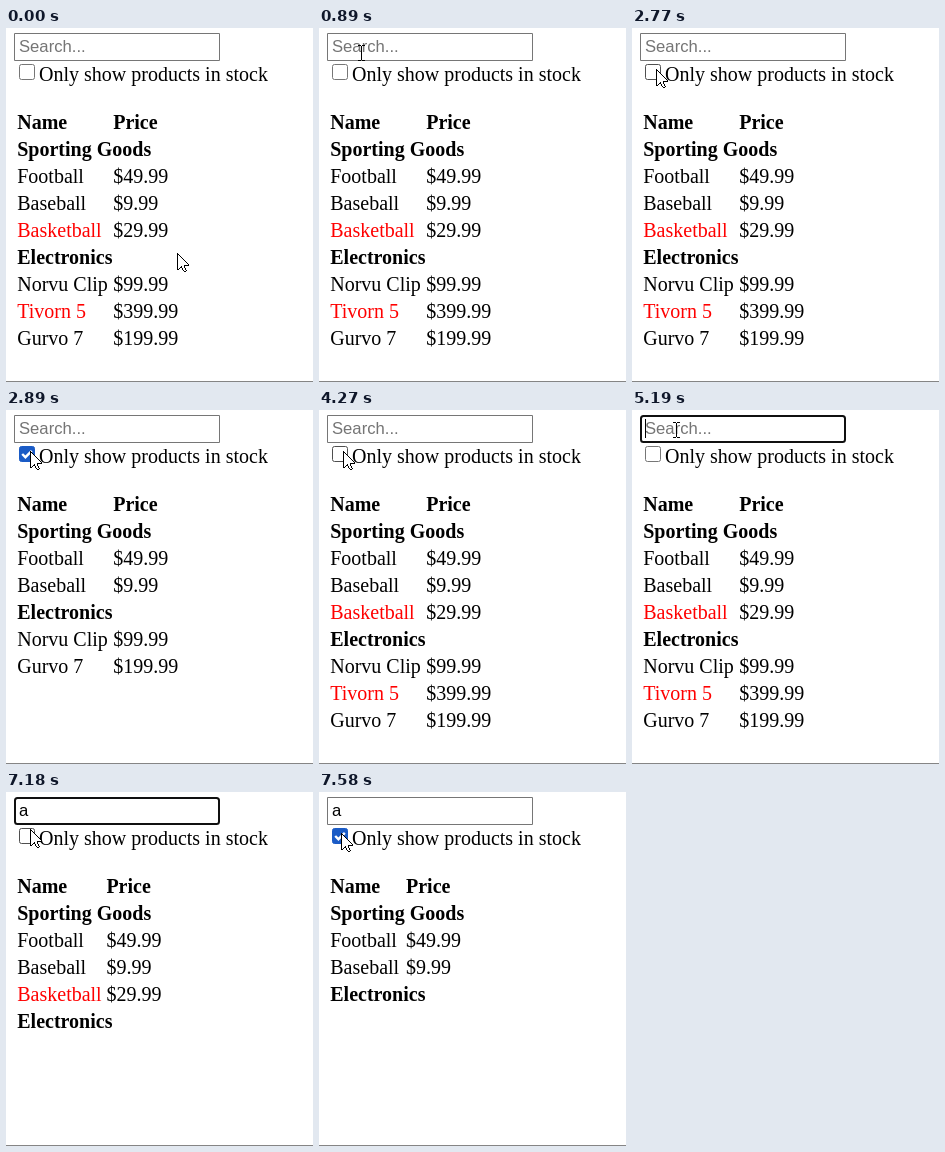
An HTML page with a canvas for the animation above (8000 ms loop, 307 px wide and 354 px high).

```html
<!DOCTYPE html>
<html lang="en">
<head>
<meta charset="utf-8">
<title>Searchable product table</title>
<style>
  html, body { margin: 0; width: 100%; height: 100%; overflow: hidden; background: #fff; }
  canvas { display: block; }
</style>
</head>
<body>
<canvas id="stage" width="307" height="354"></canvas>
<script>
const ctx = document.getElementById('stage').getContext('2d');
const LOOP = 8000;
const SERIF = '20px "Liberation Serif", "Times New Roman", serif';
const SANS = '16.67px "Liberation Sans", Arial, sans-serif';
const GREY = '#767676';

const GROUPS = [
  { title: 'Sporting Goods', items: [
    { name: 'Football', price: '$49.99', stocked: true },
    { name: 'Baseball', price: '$9.99', stocked: true },
    { name: 'Basketball', price: '$29.99', stocked: false }
  ] },
  { title: 'Electronics', items: [
    { name: 'Norvu Clip', price: '$99.99', stocked: true },
    { name: 'Tivorn 5', price: '$399.99', stocked: false },
    { name: 'Gurvo 7', price: '$199.99', stocked: true }
  ] }
];

// Pointer stops: [time, x, y, shape]
const START = [171, 225], FIELD_EDGE = [41, 32];
const smooth = u => u * u * (3 - 2 * u);
const path = [[0, ...START, 'arrow']];
[250, 370, 490, 620, 740].forEach((at, i) => {
  const u = smooth((i + 1) / 5);
  const mix = k => Math.round(START[k] + (FIELD_EDGE[k] - START[k]) * u);
  path.push([at, mix(0), mix(1), 'arrow']);
});
path.push(
  [890, 42, 25, 'beam'], [1010, 41, 20, 'beam'],
  [2380, 38, 24, 'beam'], [2500, 29, 35, 'arrow'], [2620, 24, 41, 'arrow'],
  [4830, 28, 37, 'arrow'], [4950, 39, 25, 'beam'], [5070, 44, 20, 'beam'],
  [6810, 43, 21, 'beam'], [6930, 38, 25, 'beam'], [7060, 29, 34, 'arrow'],
  [7180, 24, 37, 'arrow'], [7430, 22, 41, 'arrow']
);

const within = (t, ...spans) => spans.some(([a, b]) => t >= a && t < b);

function stateAt(t) {
  return {
    focused: within(t, [1140, 2770], [5190, 7580]),
    caret: within(t, [1140, 1670], [2260, 2770], [5190, 5970], [6520, 7050]),
    checked: within(t, [2890, 4270], [7580, LOOP]),
    query: t >= 5440 ? 'a' : '',
    pointer: path.filter(p => p[0] <= t).pop()
  };
}

function text(str, x, y, font, color = '#000') {
  ctx.font = font;
  ctx.fillStyle = color;
  ctx.fillText(str, x, y);
}

function box(x, y, w, h, r, line, stroke, fill) {
  const d = line / 2;
  ctx.beginPath();
  ctx.roundRect(x + d, y + d, w - line, h - line, r);
  ctx.fillStyle = fill;
  ctx.fill();
  ctx.lineWidth = line;
  ctx.strokeStyle = stroke;
  ctx.stroke();
}

function polyline(points) {
  ctx.beginPath();
  points.forEach(([x, y]) => ctx.lineTo(x, y));
}

// Crisp line of whole pixels
function pixelLine([x0, y0], [x1, y1]) {
  const n = Math.max(Math.abs(x1 - x0), Math.abs(y1 - y0));
  for (let i = 0; i <= n; i++) {
    const u = i / n;
    ctx.fillRect(Math.round(x0 + (x1 - x0) * u), Math.round(y0 + (y1 - y0) * u), 1, 1);
  }
}

function drawField({ focused, caret, query }) {
  if (focused) box(8, 5, 206, 28, 2.5, 2, '#101010', '#fff');
  else box(8, 5, 206, 28, 0, 1, GREY, '#fff');
  text(query || 'Search...', 13, 24, SANS, query ? '#000' : '#757575');
  if (caret) {
    ctx.fillStyle = '#000';
    ctx.fillRect(query ? 21 : 13, 9, 1, 19);
  }
}

function drawCheckbox({ checked, pointer: [, x, y] }) {
  const hover = x >= 13 && x < 29 && y >= 36 && y < 52;
  const blue = hover ? '#1a5bc6' : '#0075ff';
  const edge = checked ? blue : hover ? '#4f4f4f' : GREY;
  box(13, 36, 16, 16, 2, 1, edge, checked ? blue : '#fff');
  if (checked) {
    polyline([[16.2, 44], [19.4, 47.2], [25.8, 40.8]]);
    ctx.lineWidth = 2.4;
    ctx.strokeStyle = '#fff';
    ctx.stroke();
  }
  text('Only show products in stock', 33, 53, SERIF);
}

function drawTable({ checked, query }) {
  const left = 11.25;
  const priceX = !query ? 107.2 : checked ? 87 : 100.4;
  const bold = 'bold ' + SERIF;
  let y = 101;
  text('Name', left, y, bold);
  text('Price', priceX, y, bold);
  for (const { title, items } of GROUPS) {
    text(title, left, y += 27, bold);
    for (const { name, price, stocked } of items) {
      if (!name.includes(query) || (checked && !stocked)) continue;
      text(name, left, y += 27, SERIF, stocked ? '#000' : '#f00');
      text(price, priceX, y, SERIF);
    }
  }
}

const ARROW = [[0, 0], [0, 16], [1, 16], [4, 13], [5, 16], [7, 18], [8, 18],
               [9, 17], [7, 14], [7, 12], [11, 12], [11, 11], [0, 0]];

function drawArrow() {
  polyline(ARROW.map(([x, y]) => [x + .5, y + .5]));
  ctx.fillStyle = '#fff';
  ctx.fill();
  ctx.fillStyle = '#000';
  ARROW.slice(1).forEach((p, i) => pixelLine(ARROW[i], p));
}

function drawBeam() {
  ctx.fillStyle = '#000';
  for (const y of [-8, 7]) {
    ctx.fillRect(-3, y, 3, 1);
    ctx.fillRect(1, y, 3, 1);
  }
  ctx.fillRect(0, -7, 1, 14);
}

function draw(t) {
  const state = stateAt(t);
  const [, x, y, shape] = state.pointer;
  ctx.fillStyle = '#fff';
  ctx.fillRect(0, 0, 307, 354);
  drawField(state);
  drawCheckbox(state);
  drawTable(state);
  ctx.fillStyle = '#858585';
  ctx.fillRect(0, 353, 307, 1);
  ctx.save();
  ctx.translate(x, y);
  (shape === 'arrow' ? drawArrow : drawBeam)();
  ctx.restore();
}

let began;
function tick(now) {
  began ??= now;
  draw((now - began) % LOOP);
  requestAnimationFrame(tick);
}
draw(0);
requestAnimationFrame(tick);
</script>
</body>
</html>
```
